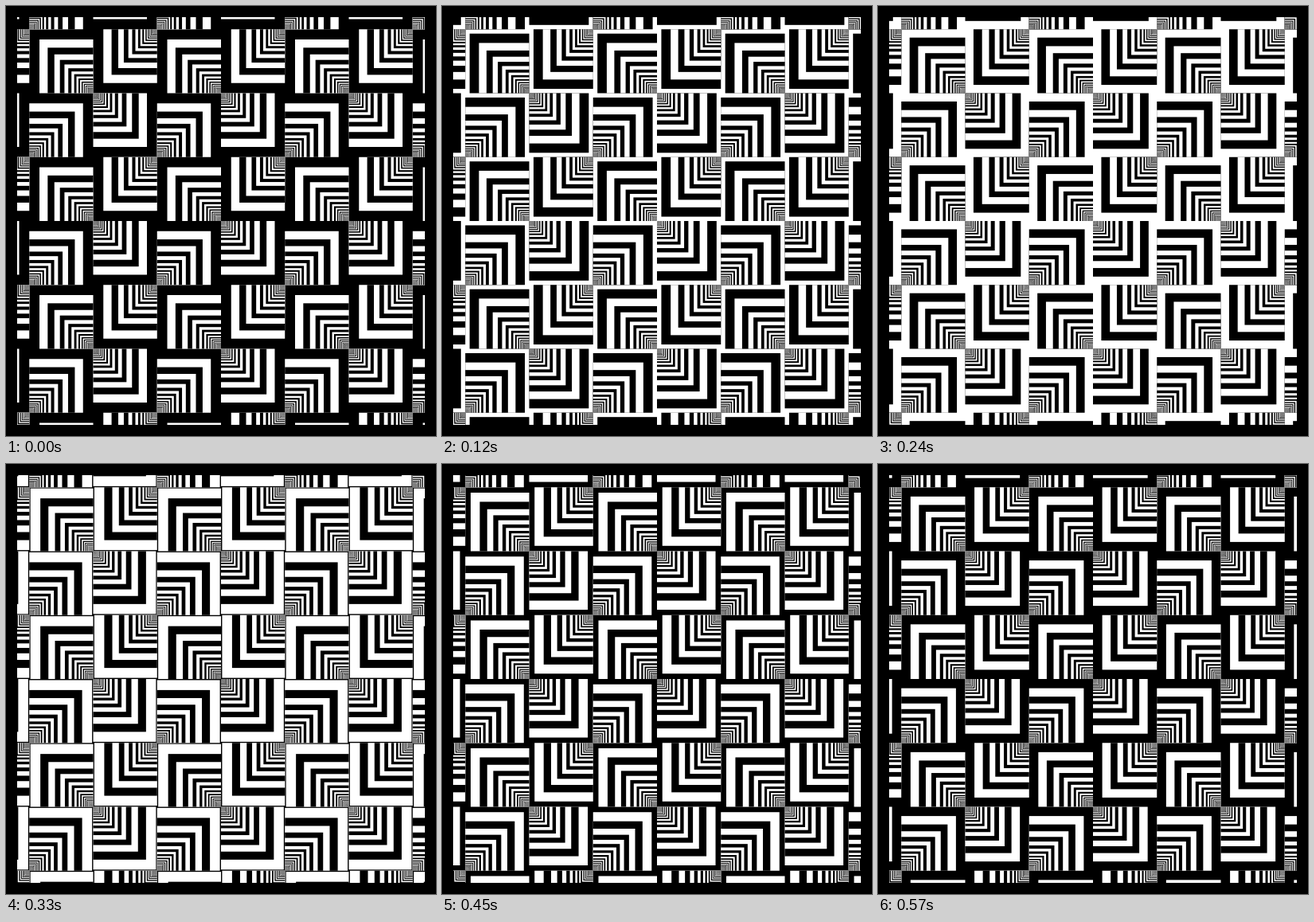
Animation, 540 px wide and 540 px high, one loop 0.6 s. Source, as an HTML page with a canvas:

```html
<!DOCTYPE html>
<html lang="en">
<head>
<meta charset="utf-8">
<title>Nested squares</title>
<style>
  html, body { margin: 0; width: 100%; height: 100%; overflow: hidden; background: #000; }
  canvas { display: block; width: 540px; height: 540px; }
</style>
</head>
<body>
<canvas id="stage" width="540" height="540"></canvas>
<script>
const ctx = document.getElementById('stage').getContext('2d');
const LOOP = 600, STEP = 30;
const CENTER = 270, CELL = 80.25;
const EDGE = 14, PANEL = 512;
const DEPTH = 22.6, POWER = 4;

const color = band => band % 2 === 0 ? '#fff' : '#000';

// Side of a square that entered the cell `age` half loops ago.
const side = age => CELL / (1 + age / DEPTH) ** POWER;

// Squares shrink towards one corner of the cell.
function drawCell(col, row, band, shift) {
  const x = CENTER + (col - 3) * CELL;
  const y = CENTER + (row - 3) * CELL;
  const toRight = row % 2 === 0;
  const toBottom = col % 2 === 0;
  for (let i = 0, size; (size = side(shift + i)) > 0.5; i++) {
    ctx.fillStyle = color(band + 1 + i);
    ctx.fillRect(toRight ? x + CELL - size : x, toBottom ? y + CELL - size : y, size, size);
  }
}

function draw(time) {
  const phase = 2 * time / LOOP;
  const band = Math.ceil(phase) - 1;
  ctx.fillStyle = '#000';
  ctx.fillRect(0, 0, 540, 540);
  ctx.save();
  ctx.beginPath();
  ctx.rect(EDGE, EDGE, PANEL, PANEL);
  ctx.clip();
  ctx.fillStyle = color(band);
  ctx.fillRect(EDGE, EDGE, PANEL, PANEL);
  for (let row = -1; row <= 6; row++)
    for (let col = -1; col <= 6; col++) drawCell(col, row, band, phase - band);
  ctx.restore();
}

const start = performance.now();
function tick() {
  const time = (performance.now() - start) % LOOP;
  draw(Math.floor(time / STEP) * STEP);
  requestAnimationFrame(tick);
}
tick();
</script>
</body>
</html>
```
